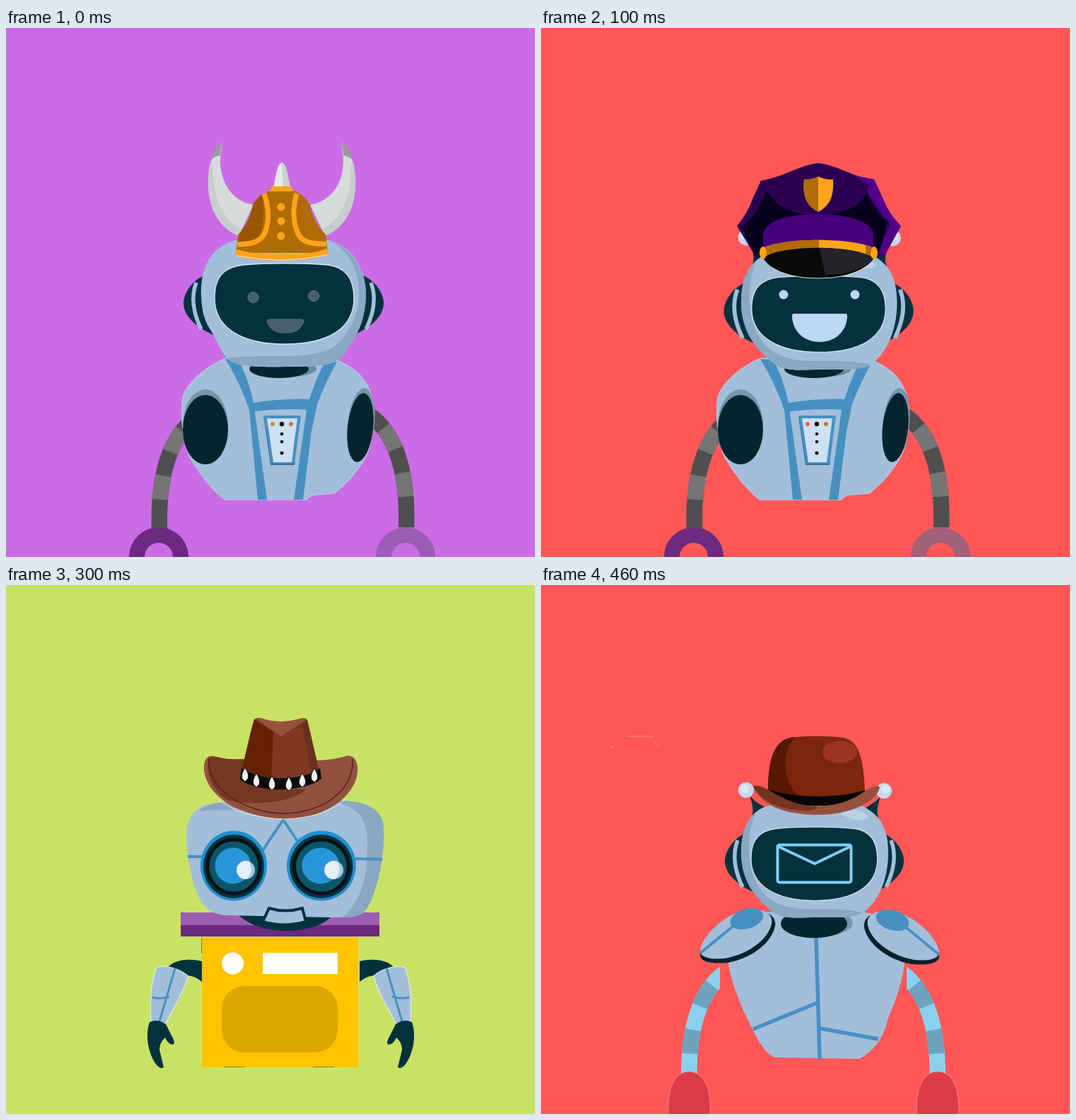
Animation, 748 px wide and 748 px high, one loop 500 ms. Source, as an HTML page:

```html
<!DOCTYPE html>
<html lang="en">
<head>
<meta charset="utf-8">
<title>Robot outfits</title>
<style>
html, body { margin: 0; width: 100%; height: 100%; overflow: hidden; }
svg { display: block; width: 100%; height: 100%; }
.steel { fill: #a3bedb; }
.shade { fill: #8aa7c3; }
.dark { fill: #03323e; }
.blue { fill: #4690c1; }
.gold { fill: #ffa31a; }
.bronze { fill: #b06c03; }
.line { fill: none; stroke: #4690c1; stroke-width: 4; }
.glow { fill: #bdd7f5; }
.rim { stroke: #dbe7f2; stroke-width: 1.3; }
.segments { stroke: var(--segment); stroke-dasharray: 0 28 34 35 34 99; }
.grey { color: #4f4f4f; --segment: #757575; }
.sky { color: #8bd1ef; --segment: #6fa3bd; }
</style>
</head>
<body>
<svg viewBox="0 0 748 748">
<defs>
  <clipPath id="sides"><path d="M0 0H253V748H0zM517 0H748V748H517z"/></clipPath>

  <g id="hose" fill="none" stroke-width="22.5">
    <path stroke="currentColor" d="M262 547C225 572 207 627 209.500 706"/>
    <path class="segments" d="M262 547C225 572 207 627 209.500 706"/>
  </g>

  <g id="ear">
    <path class="dark" d="M27-38C10-30 0-12 0 0C0 16 13 32 44 46V-38z"/>
    <path fill="none" stroke="#a3bedb" stroke-width="5.500" d="M18-29Q7 0 25 37"/>
  </g>

  <path id="visor" class="dark rim" d="M0 49C0 17 15 5 40 2C75-1 125-1 160 2C185 5 197 22 197 49C197 92 160 114 99 114C40 114 0 92 0 49z"/>

  <g id="antenna">
    <path class="dark" d="M295 298L302 305Q312 312 320 316L298 328Q302 318 296 301z"/>
    <circle cx="290" cy="290" r="11" fill="#c5d8ee"/>
    <circle cx="288" cy="288" r="6" fill="#dde8f5"/>
  </g>

  <g id="head">
    <use href="#antenna"/>
    <use href="#antenna" transform="matrix(-1 0 0 1 775 1)"/>
    <use href="#ear" x="260" y="390"/>
    <use href="#ear" transform="matrix(-1 0 0 1 513 390)"/>
    <path class="steel" d="M283 378C283 345 296 318 322 312C365 306 430 308 455 313C480 325 491 345 491 378C491 420 475 450 455 464C440 472 420 469 390 470C365 470 345 473 330 464C305 445 283 420 283 378z"/>
    <path class="shade" d="M304 321C289 335 283 355 283 378C283 420 305 445 330 464C345 473 365 470 390 470C420 469 440 472 455 463C425 456 400 459 370 458C335 456 320 444 310 430C290 400 290 350 304 321z"/>
    <path fill="#b9cfe6" d="M425 318Q455 314 463 328Q455 338 425 325z"/>
    <use href="#visor" transform="translate(297 342.500) scale(.907 .91)"/>
  </g>

  <g id="vest">
    <path class="steel" stroke="#b5c3dc" stroke-width="1.500" d="M311 467C283 478 256 502 250 522C245 560 255 600 262 610C280 640 298 659 310 667H425Q430 660 437 660L464 658C490 638 512 608 516 585L520 545C520 505 500 483 468 470z"/>
    <path class="blue" d="M310 468L329 469Q344 500 350 530L369 667H356L344 540Q330 500 310 468zM449 475L468 472Q450 505 440 532L432 570L420 667H407L425 540Q432 510 449 475zM344 531Q390 523 436 525L431 540Q390 537 345 543z"/>
    <g fill="#7595ad">
      <ellipse cx="282" cy="562" rx="32" ry="51"/>
      <ellipse cx="502" cy="561" rx="19" ry="52" transform="rotate(6 502 561)"/>
    </g>
    <g fill="#04252e">
      <ellipse cx="282" cy="568" rx="32" ry="49"/>
      <ellipse cx="501" cy="565" rx="18" ry="49" transform="rotate(6 501 565)"/>
    </g>
    <path fill="#2f6f99" d="M364 549L374 618H408L409 614z"/>
    <path class="blue" d="M364 548H417L408 616H375z"/>
    <path fill="#cde1f5" d="M369 552H412L404 614H378z"/>
    <g fill="#111">
      <circle cx="390" cy="560" r="3.200"/>
      <circle cx="390" cy="574" r="2.300"/>
      <circle cx="390" cy="585" r="2.300"/>
      <circle cx="390" cy="601" r="2.500"/>
    </g>
    <circle cx="377" cy="560" r="3" fill="currentColor"/>
    <circle cx="403" cy="560" r="3" fill="#c47a1a"/>
    <ellipse cx="394" cy="482" rx="45" ry="12" fill="#6b8ca0"/>
    <ellipse cx="386" cy="482" rx="42" ry="13" fill="#03262f"/>
  </g>

  <g id="hoseArms" class="grey">
    <use href="#hose" x="7.500" y="4"/>
    <use href="#hose" transform="matrix(-1 0 0 1 775.500 0)"/>
    <circle cx="216" cy="748" r="31" fill="none" stroke="#6b2a80" stroke-width="22"/>
    <circle cx="565" cy="748" r="31" fill="none" stroke="var(--ring)" stroke-width="22"/>
  </g>

  <g id="box">
    <path fill="#9d5cb3" d="M247 463H528V482H247z"/>
    <path fill="#6b2a80" d="M247 481H528V497H247z"/>
    <path fill="#ffc400" d="M277 498H498V682H277z"/>
    <path fill="#8d7d20" d="M276 498h1v23h-1zM308 681h30v1h-30zM434 681h30v1h-30z"/>
    <circle cx="320.500" cy="535" r="15.500" fill="#fff"/>
    <path fill="#fff" d="M363 520H469V550H363z"/>
    <rect x="305" y="567" width="164" height="94" rx="32" fill="#dca800"/>
  </g>

  <g id="raisedArm">
    <path fill="none" stroke="#03323e" stroke-width="23" d="M217 505Q228 545 253 566"/>
    <circle class="dark" cx="256.500" cy="568" r="12"/>
    <path class="steel rim" d="M189 411L207 408C217 440 229 470 231 500C231 508 195 519 181 512C174 505 177 480 177 460C179 440 184 420 189 411z"/>
    <path class="line" style="stroke-width:3" d="M201 410L203 470V513M178 459Q195 454 217 457"/>
    <path fill="none" stroke="#03323e" stroke-width="8" stroke-linecap="round" d="M185 380L179 351M194 378L195 346M203 390L218 371"/>
    <path class="dark" d="M172 384C172 372 183 368 197 372C212 378 212 395 205 408Q197 414 187 410C175 404 171 397 172 384z"/>
  </g>

  <g id="loweredArm">
    <path class="dark" d="M277 532C255 527 237 531 228 541L256 552Q268 553 277 561z"/>
    <path class="steel rim" d="M213 541C225 535 250 545 257 553C250 580 235 600 226 620L205 617C203 590 205 560 213 541z"/>
    <path class="line" style="stroke-width:3" d="M239 542L217 617M207 583Q218 586 231 582"/>
    <path class="dark" d="M203 618Q215 613 226 621L237 643C241 652 231 653 225 640Q217 647 217 657L223 682C215 687 205 670 201 650Q198 632 203 618z"/>
  </g>

  <g id="cap">
    <path fill="#2b0053" d="M392 191C420 194 440 211 471 214L486 247Q492 262 508 280L480 324H304L277 280Q292 262 299 242L311 216C345 210 365 194 392 191z"/>
    <path fill="#52008a" d="M440 208L471 214L486 247Q492 262 509 280L486 322L476 320L494 276Q476 258 461 231L464 222z"/>
    <path fill="#06001c" d="M319 229C330 250 350 262 380 264C345 268 315 275 314 295V310L303 322L284 281Q308 262 319 229zM461 231C455 250 430 262 404 264C440 268 470 280 470 300V312L477 321L490 275Q470 257 461 231z"/>
    <path fill="#46007d" d="M314 290C320 272 350 263 392 263C435 263 468 275 470 290V318H314z"/>
    <path class="gold" d="M314 311C345 296 440 296 470 311V325C440 308 345 308 314 325z"/>
    <path class="bronze" d="M314 311Q343 299 393 299.700V312Q345 309 314 325zM459 306.500L470 311V325L459 319z"/>
    <path fill="#0a0a0a" d="M314 325C340 306 440 306 471 325C460 342 430 354 392 354C355 354 325 344 314 325z"/>
    <path fill="#222429" d="M394 311Q445 311 470 325C460 340 430 349 402 349z"/>
    <path fill="none" stroke="#d8dce3" d="M325 338Q350 354 392 354Q435 354 461 338"/>
    <ellipse class="gold" cx="314" cy="318" rx="5" ry="9"/>
    <ellipse class="gold" cx="471" cy="318" rx="5" ry="9"/>
    <path class="gold" d="M392 210Q402 215 413 214C414 235 411 250 392 260C373 250 370 235 372 214Q383 215 392 210z"/>
    <path class="bronze" d="M392 210V260C373 250 370 235 372 214Q383 215 392 210z"/>
  </g>

  <g id="horn">
    <path fill="#d5dcda" d="M304 161C285 185 280 225 293 258C302 278 315 288 329 294L350 250C320 245 304 220 303 190Q303 178 306 163z"/>
    <path fill="#c6cdcb" d="M288 192C283 225 288 255 305 276Q317 289 329 294L333 284C305 270 292 240 292 192z"/>
    <path fill="#9a9a9a" d="M304 161Q293 171 289 188Q295 181 303 180Q303 172 306 163z"/>
  </g>

  <g id="eye">
    <ellipse cx="322" cy="397" rx="47" ry="49.500" fill="#1f8fd0"/>
    <ellipse cx="322" cy="398" rx="43" ry="45" class="dark"/>
    <ellipse cx="322" cy="398" rx="37" ry="38" fill="#0c566b" stroke="#0a1216" stroke-width="5"/>
    <circle cx="321" cy="397" r="25.500" fill="#2796d8"/>
    <circle cx="339" cy="403" r="13" fill="#a9c7e0"/>
    <path fill="#e6eff8" d="M344 391A13 13 0 1 0 340 416Q351 406 344 391z"/>
  </g>

  <path id="tooth" fill="#eef2f2" stroke="#111" d="M0-10C3-4 6 0 4 6L0 10L-4 6C-6 0-3-4 0-10z"/>

  <g id="shoulder">
    <path fill="#04202a" d="M225 523C228 500 260 470 290 463C318 458 333 467 331 482C326 508 294 529 264 534C242 536 225 533 225 523z"/>
    <path class="steel" d="M225 517C228 495 260 465 290 460C315 456 329 465 326 479C321 503 290 523 260 528C240 530 225 527 225 517z"/>
    <path class="line" d="M272 482L226 520"/>
    <ellipse class="blue" cx="291" cy="472" rx="24" ry="14" transform="rotate(-17 291 472)"/>
  </g>

  <path id="mitt" fill="#db3b47" stroke="#e8a0a0" stroke-width=".7" d="M180 749C178 720 185 688 209.500 688C234 688 241 720 239 749z"/>
</defs>

<g class="scene" data-sky="#cb6ce6" style="--ring:#9b5cb5;color:#cf8a1c">
  <use href="#hoseArms"/>
  <use href="#vest"/>
  <use href="#ear" x="251" y="389"/>
  <use href="#ear" transform="matrix(-1 0 0 1 534 389)"/>
  <path class="steel" d="M276 380C274 340 290 308 325 300H458C495 312 508 345 509 375C508 425 490 440 478 462C465 478 440 479 395 479C350 480 325 478 313 468C303 455 297 440 288 425C280 412 277 400 276 380z"/>
  <path class="shade" d="M458 301C490 310 509 345 509 375C508 425 490 440 478 462C465 478 440 479 395 479C350 480 325 478 313 467C330 464 360 464 390 464C440 464 462 455 472 443C492 420 500 400 499 370C497 335 480 312 458 301z"/>
  <use href="#visor" x="295" y="333"/>
  <g fill="#475f70" stroke="#5f7684">
    <circle cx="349.500" cy="381" r="7.500"/>
    <circle cx="435" cy="379" r="7.500"/>
    <path d="M373 412H417Q422 412 420 417C416 427 408 431 395 431C382 431 374 427 370 417Q368 412 373 412z"/>
  </g>
  <use href="#horn"/>
  <use href="#horn" transform="matrix(-1 0 0 1 780 0)"/>
  <path fill="#e3e9e8" d="M390 190C382 194 382 212 378 225H402C398 210 398 194 390 190z"/>
  <path fill="#cbd2d0" d="M390 190Q391 210 392 225H402C398 210 398 194 390 190z"/>
  <path class="bronze" d="M374 229H406Q423 237 430 250C434 272 443 282 452 292L455 318H325L328 293C337 282 345 271 349 250Q357 237 374 229z"/>
  <path fill="#9a5600" d="M362 235Q352 243 349 250C345 271 337 282 328 293V302Q350 302 358 294Q368 270 362 235z"/>
  <g fill="none" stroke="#ffa31a" stroke-width="7">
    <path d="M365 234C372 255 372 275 366 290C360 303 345 306 327 306M411 234C405 255 406 275 413 291Q420 307 453 305"/>
    <path stroke-width="9" d="M325 317C350 327 430 327 455 316"/>
  </g>
  <path class="gold" d="M376 224H403L407 231H372z"/>
  <path fill="none" stroke="#e9eef2" d="M326 322Q390 335 454 321"/>
  <g class="gold">
    <circle cx="389" cy="253" r="5.500"/>
    <circle cx="389" cy="273" r="5.500"/>
    <circle cx="389" cy="294" r="5.500"/>
  </g>
</g>

<g class="scene" data-sky="#ff5757" style="--ring:#a06179;color:#f55">
  <use href="#hoseArms"/>
  <use href="#vest"/>
  <use href="#head" transform="matrix(1.06 0 0 1.04 -17 -5.700)"/>
  <g class="glow">
    <circle cx="343" cy="377" r="6.500"/>
    <circle cx="444" cy="377" r="6.500"/>
    <path d="M357 404H431Q433 404 433 408C432 430 415 444 394 444C373 444 356 430 355 408Q355 404 357 404z"/>
  </g>
  <use href="#cap"/>
</g>

<g class="scene" data-sky="#5ce1e6">
  <use href="#raisedArm"/>
  <use href="#raisedArm" transform="matrix(-1 0 0 1 777.500 -1)"/>
  <use href="#box"/>
  <use href="#head" transform="translate(-1 2)"/>
  <path fill="#d98c3f" stroke="#d98c3f" stroke-width="8" stroke-linejoin="round" d="M390 368L421 422H359z"/>
  <path class="dark" d="M388 384H396L394 406H390zM389 409H395V415H389z"/>
  <use href="#cap"/>
</g>

<g class="scene" data-sky="#c9e265">
  <use href="#loweredArm"/>
  <use href="#loweredArm" transform="matrix(-1 0 0 1 777 0)"/>
  <use href="#box"/>
  <path class="dark" d="M328 466C345 482 370 489 397 489C430 488 450 480 462 467z"/>
  <path class="steel" d="M255 350C257 320 275 308 310 307L480 305C515 308 534 320 534 345C536 390 522 440 510 458C500 470 480 470 460 470L310 467C285 465 275 450 268 430C258 400 255 370 255 350z"/>
  <path class="shade" d="M480 305C515 308 534 320 534 345C536 390 522 440 510 458C502 470 490 470 475 470C500 450 510 420 511 375C512 335 505 315 460 305zM272 320C285 308 300 307 330 307L345 318Q300 317 272 320z"/>
  <path class="line" d="M257 384H280M494 387L532 388M363 375L392 332L412 362"/>
  <use href="#eye"/>
  <use href="#eye" transform="matrix(1.040 0 0 1 111 0)"/>
  <path class="steel" stroke="#03323e" stroke-width="4" d="M372 457Q395 464 419 457L424 476Q393 485 363 476z"/>
  <path fill="#92503f" d="M280 262C279 245 286 239 298 243Q315 248 337 246L440 248Q465 247 480 242C492 239 498 248 497 265C493 300 450 331 395 331C330 328 285 300 280 262z"/>
  <path fill="#743820" d="M298 243Q315 248 338 246L333 275C360 290 400 291 425 288C410 305 360 314 313 304C290 288 282 265 286 245z"/>
  <path fill="none" stroke="#5c2010" stroke-width="1.500" d="M287 246C284 290 340 323 395 323C450 321 492 290 490 246"/>
  <path fill="none" stroke="#f0e6d8" d="M300 304Q340 331 395 331Q450 329 482 302"/>
  <path fill="#7c3820" d="M351 190Q356 186 366 190C380 194 398 194 412 190Q424 186 426 191L443 264C420 282 360 282 333 264C340 235 345 210 351 190z"/>
  <path fill="#662204" d="M351 190L378 208L375 275Q350 273 333 264C340 235 345 210 351 190z"/>
  <path fill="#6b2f1d" d="M418 196L426 191L443 264L432 268z"/>
  <path fill="#97513f" d="M353 189Q357 187 366 190C380 194 398 194 412 190Q422 187 425 190L389 214z"/>
  <path fill="#0c0c0c" d="M333 259C360 278 420 278 444 259L446 274C420 294 355 294 331 275z"/>
  <use href="#tooth" x="338" y="268"/>
  <use href="#tooth" x="354" y="276"/>
  <use href="#tooth" x="376" y="280"/>
  <use href="#tooth" x="400" y="281"/>
  <use href="#tooth" x="419" y="276"/>
  <use href="#tooth" x="436" y="269"/>
</g>

<g class="scene" data-sky="#ff5757">
  <path fill="none" stroke="#ffb0a8" stroke-width=".6" d="M122 214H158M160 221L167 230M98 229H104"/>
  <g class="sky" clip-path="url(#sides)">
    <use href="#hose"/>
    <use href="#hose" transform="matrix(-1 0 0 1 770 0)"/>
  </g>
  <use href="#mitt"/>
  <use href="#mitt" x="351.500"/>
  <path class="steel" d="M265 535C270 570 290 610 300 630C310 650 320 665 332 668L450 670C470 660 485 640 490 615C505 580 512 555 514 535L515 500C500 470 460 460 440 462H320C290 470 262 500 265 535z"/>
  <path class="line" style="stroke-width:5.500" d="M389 498L394 670M300 628L390 591M395 627L477 642"/>
  <ellipse cx="395" cy="478" rx="46" ry="19" fill="#7894a8"/>
  <ellipse cx="386" cy="479" rx="47" ry="20" fill="#03262f"/>
  <use href="#shoulder"/>
  <use href="#shoulder" transform="matrix(-1 0 0 1 788 2)"/>
  <use href="#head"/>
  <g fill="none" stroke="#7fd0f5" stroke-width="4" stroke-linejoin="round">
    <rect x="334.500" y="367.500" width="104" height="53" rx="3"/>
    <path d="M336 370L387 394L437 370"/>
  </g>
  <path fill="#7c260d" d="M321 292C321 250 328 216 360 215Q395 212 428 216C452 222 456 250 458 292C440 304 345 304 321 292z"/>
  <path fill="#571803" d="M321 292C321 250 328 216 360 215C340 235 340 275 365 300Q335 298 321 292z"/>
  <ellipse cx="422.500" cy="236" rx="24.500" ry="15.500" fill="#983325"/>
  <path fill="#0a0606" d="M321 289C360 302 420 302 458 290V300C440 315 345 318 321 300z"/>
  <path fill="#95503f" d="M300 285C305 281 318 287 325 292C350 307 370 313 390 313C420 312 440 305 460 290Q476 281 479 286C475 305 440 325 392 325C345 325 312 312 300 285z"/>
  <path fill="#743420" d="M300 285C305 281 318 287 325 292Q355 312 390 313Q390 319 375 319C340 318 312 308 300 285z"/>
</g>
</svg>
<script>
const scenes = [...document.querySelectorAll('.scene')];
const HOLD = 100;

function draw() {
  const active = Math.floor(performance.now() / HOLD) % scenes.length;
  scenes.forEach((scene, i) => { scene.style.display = i === active ? '' : 'none'; });
  document.body.style.background = scenes[active].dataset.sky;
  requestAnimationFrame(draw);
}
draw();
</script>
</body>
</html>
```
